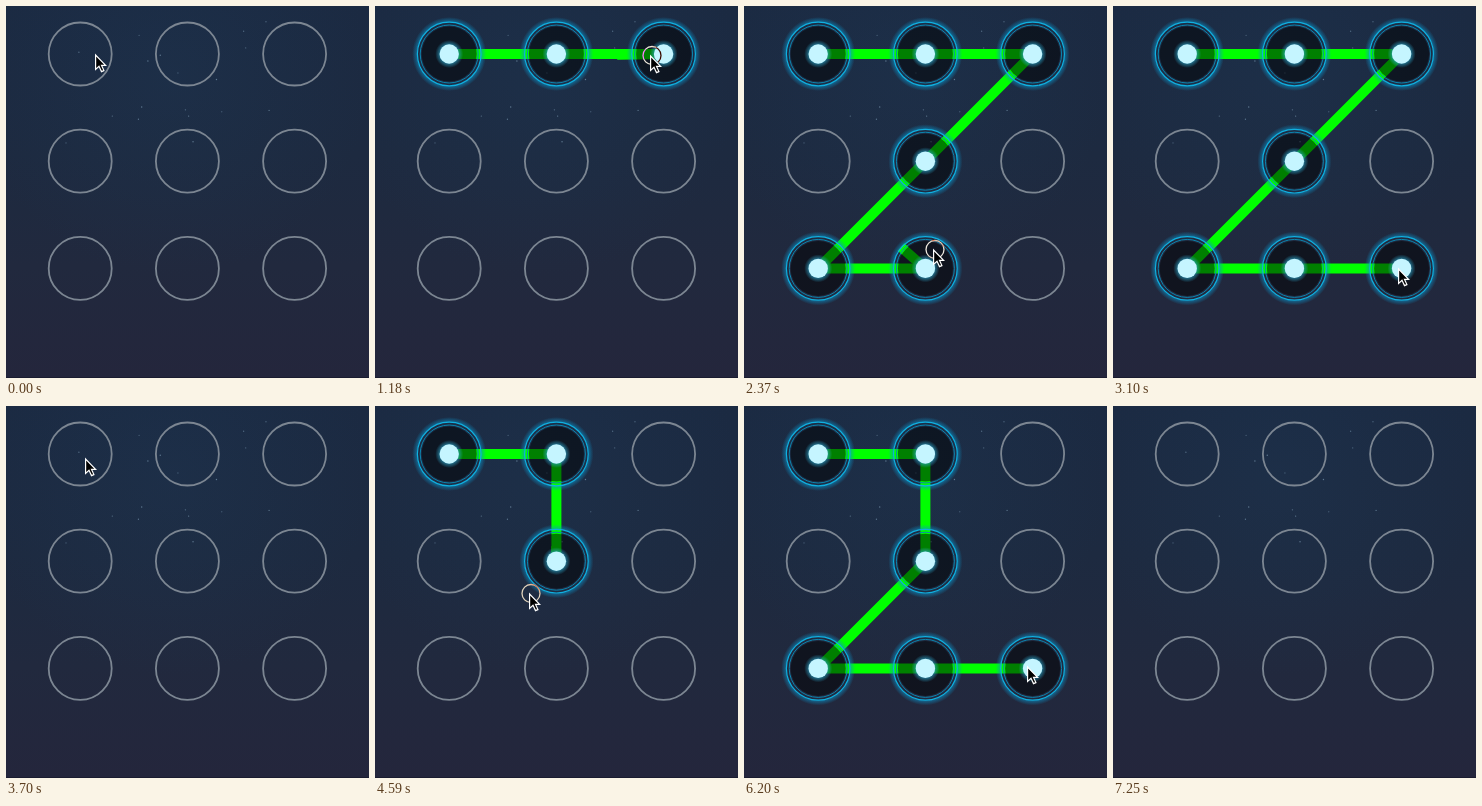
Recreate the animation shown at these times as an HTML page. Size 363 by 372 pixels, loop 8.74 s.

```html
<!DOCTYPE html>
<html lang="en">
<head>
<meta charset="utf-8">
<title>Pattern lock</title>
<style>
html, body { margin: 0; width: 100%; height: 100%; overflow: hidden; background: #1f2b42; }
svg { display: block; width: 363px; height: 372px; }
#press { mix-blend-mode: difference; }
</style>
</head>
<body>
<svg viewBox="0 0 363 372">
  <defs>
    <linearGradient id="sky" x1="0" y1="0" x2="0" y2="1">
      <stop offset="0" stop-color="#1b2a42"/>
      <stop offset=".4" stop-color="#1d2a40"/>
      <stop offset=".7" stop-color="#21293e"/>
      <stop offset="1" stop-color="#24263c"/>
    </linearGradient>
    <radialGradient id="haze" gradientUnits="userSpaceOnUse" cx="165" cy="70" r="200">
      <stop offset="0" stop-color="#1f3d5c" stop-opacity=".25"/>
      <stop offset="1" stop-color="#1f3d5c" stop-opacity="0"/>
    </radialGradient>
    <radialGradient id="halo" gradientUnits="userSpaceOnUse" cx="0" cy="0" r="37">
      <stop offset=".86" stop-color="#0a94cc" stop-opacity=".6"/>
      <stop offset="1" stop-color="#0a94cc" stop-opacity="0"/>
    </radialGradient>
    <radialGradient id="glow" gradientUnits="userSpaceOnUse" cx="0" cy="0" r="14">
      <stop offset=".65" stop-color="#2fb4dc" stop-opacity=".6"/>
      <stop offset="1" stop-color="#2fb4dc" stop-opacity="0"/>
    </radialGradient>
    <g id="lit">
      <circle r="34.5" fill="none" stroke="url(#halo)" stroke-width="5"/>
      <circle r="27.5" fill="#000" fill-opacity=".5"/>
      <circle r="29" fill="none" stroke="#0b86b0" stroke-width="1"/>
      <circle r="31.8" fill="none" stroke="#10b0e0" stroke-width="1.2"/>
      <circle r="14" fill="url(#glow)"/>
      <circle r="9.7" fill="#c5f5ff"/>
    </g>
  </defs>
  <rect width="363" height="372" fill="url(#sky)"/>
  <rect width="363" height="372" fill="url(#haze)"/>
  <rect y="371" width="363" height="1" fill="#1a1c30"/>
  <g id="stars" fill="#8fb0c8"></g>
  <g id="idle" fill="none" stroke="#7c8692" stroke-width="1.8"></g>
  <path id="trail" fill="none" stroke="#0f0" stroke-width="10" stroke-linejoin="round" stroke-linecap="round"/>
  <path id="live" fill="none" stroke="#0f0" stroke-width="10"/>
  <g id="nodes"></g>
  <circle id="press" cx="2" cy=".5" r="9" fill="none" stroke="#fff" stroke-width="1.3"/>
  <path id="arrow" d="M.6 1V15.4L4 12.2L6.5 17.6L8.9 16.6L6.5 11.3H10.6Z" fill="#000" stroke="#fff" stroke-width="1.2"/>
</svg>
<script>
const LOOP = 8740, STEP = 147.93, LAST = 49, REACH = 33;
const $ = id => document.getElementById(id);

function add(parent, tag, attrs) {
  const el = document.createElementNS("http://www.w3.org/2000/svg", tag);
  for (const k in attrs) el.setAttribute(k, attrs[k]);
  return parent.appendChild(el);
}

const show = (el, on) => el.setAttribute("visibility", on ? "visible" : "hidden");
const move = (el, [x, y]) => el.setAttribute("transform", `translate(${x} ${y})`);

const cells = Array.from({ length: 9 }, (_, i) => [
  74.2 + (i % 3) * 107.2,
  48 + Math.floor(i / 3) * 107.2
]);

// Steps at which each stroke starts, is released and is wiped
const strokes = [
  { down: 1, up: 20, clear: 23 },
  { down: 26, up: 39, clear: 42 }
];

// Turning points of the pointer: step, x, y
const turns = [
  [0, 89, 48], [2, 78, 48], [8, 275, 49], [9, 282, 49],
  [14, 88, 248], [15, 157, 241], [16, 189, 243], [19, 285, 262], [22, 285, 262],
  [25, 79, 52], [29, 170, 50], [30, 181, 140], [31, 154, 187],
  [33, 82, 258], [37, 285, 280], [38, 283, 260], [41, 283, 260], [45, 331, 330], [LAST, 331, 330]
];

function pointer(n) {
  const i = Math.max(1, turns.findIndex(t => t[0] >= n));
  const [a, x, y] = turns[i - 1], [b, u, v] = turns[i];
  const p = (n - a) / (b - a);
  return [x + (u - x) * p, y + (v - y) * p];
}

// Cells the pointer has touched between two steps, in order
function touched(from, to) {
  const hit = new Set();
  for (let n = from; n <= to; n++) {
    const [x, y] = pointer(n);
    cells.forEach(([cx, cy], i) => {
      if (Math.hypot(x - cx, y - cy) < REACH) hit.add(i);
    });
  }
  return [...hit];
}

let seed = 7;
const rand = () => (seed = seed * 16807 % 2147483647) / 2147483647;
for (let i = 0; i < 18; i++) {
  add($("stars"), "circle", {
    cx: 60 + rand() * 220, cy: 8 + rand() * 140, r: .7, opacity: .3 + rand() * .3
  });
}

const rings = cells.map(([cx, cy]) => add($("idle"), "circle", { cx, cy, r: 31.5 }));
const nodes = cells.map(c => {
  const el = add($("nodes"), "use", { href: "#lit" });
  move(el, c);
  return el;
});

function draw(ms) {
  const n = Math.min(LAST, Math.floor((ms + Math.min(12, ms * .004)) / STEP));
  const stroke = strokes.find(s => n >= s.down && n < s.clear);
  const on = stroke ? touched(stroke.down, Math.min(n, stroke.up)) : [];
  const down = !!stroke && n < stroke.up;
  const loose = down && on.length > 0;
  const tip = pointer(n);

  cells.forEach((_, i) => {
    show(nodes[i], on.includes(i));
    show(rings[i], !on.includes(i));
  });
  $("trail").setAttribute("d", on.length > 1 ? "M" + on.map(i => cells[i]).join("L") : "");
  // The loose end lags one step behind the pointer
  $("live").setAttribute("d", loose ? `M${cells[on[on.length - 1]]}L${pointer(n - 1)}` : "");
  move($("press"), tip);
  move($("arrow"), tip);
  show($("press"), down);
  show($("arrow"), n < LAST);
}

const start = performance.now();
function tick() {
  draw((performance.now() - start) % LOOP);
  requestAnimationFrame(tick);
}
tick();
</script>
</body>
</html>
```
